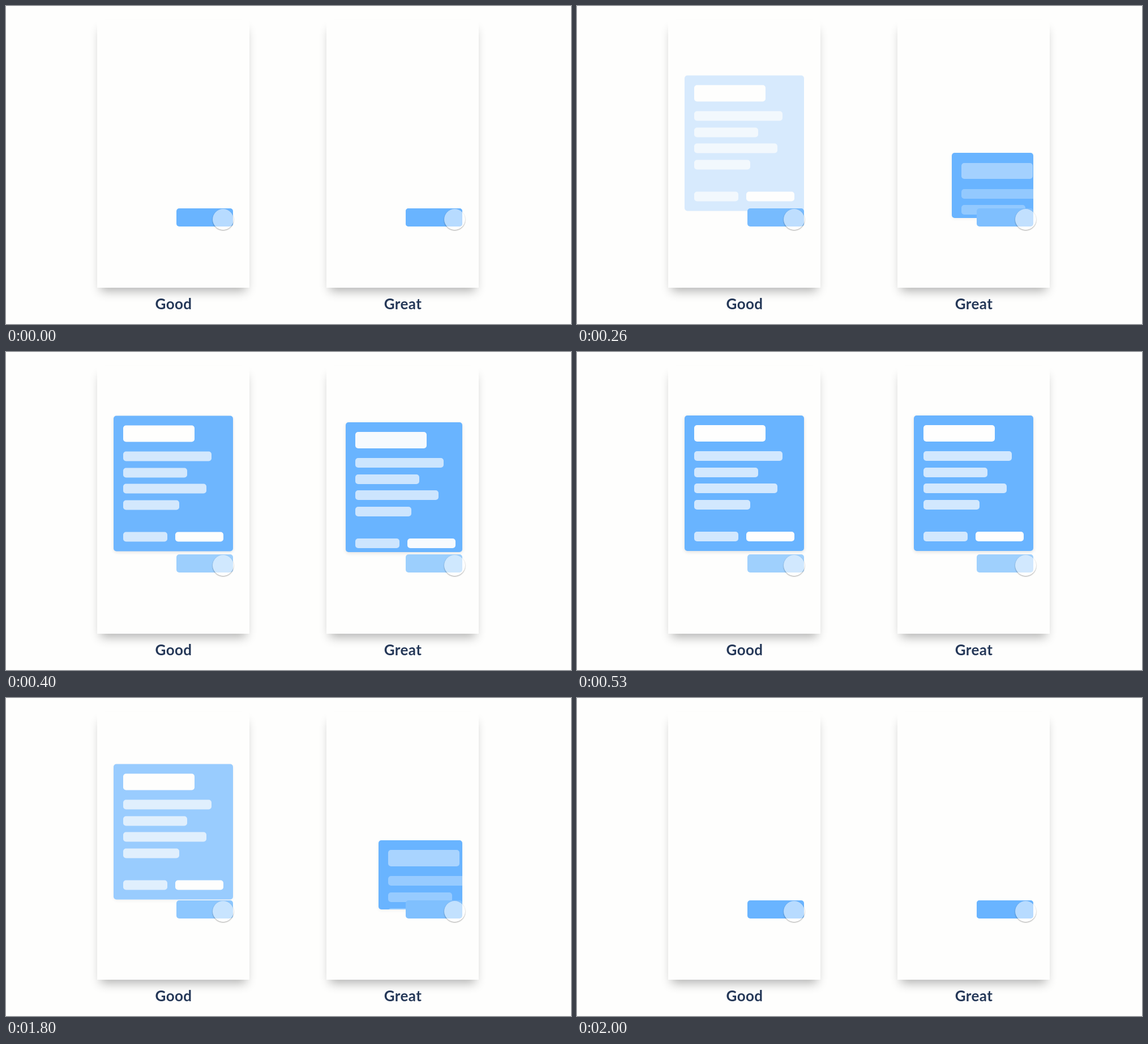
An HTML page for the animation above (2130 ms loop, 998 px wide and 561 px high).

```html
<!DOCTYPE html>
<html lang="en">
<head>
<meta charset="utf-8">
<title>Good and great dialogs</title>
<style>
  @property --p { syntax: "<number>"; inherits: true; initial-value: 0; }
  html, body { margin: 0; width: 100%; height: 100%; overflow: hidden; background: #fefefd; }
  .side { position: absolute; left: 0; top: 0; }
  .side div { position: absolute; box-sizing: border-box; }
  .side .panel {
    left: 161px; top: 24px; width: 269px; height: 473px; background: #fefefd;
    box-shadow: 0 12px 17px -6px rgba(0,0,0,.3);
  }
  .side .card {
    left: 190px; top: 111.5px; width: 211px; height: 239.5px;
    border-radius: 5px; background: #69b4ff; overflow: hidden;
    box-shadow: 0 2px 6px rgba(0,0,0,calc(.12 * var(--p)));
  }
  .fade .card {
    opacity: var(--p);
    transform: translateY(calc(14px * (1 - var(--p))));
  }
  .grow .card {
    left: calc(301px - 111px * var(--p));
    top: calc(357px - 245.5px * var(--p));
    width: calc(100px + 111px * var(--p));
    height: calc(32px + 207.5px * var(--p));
  }
  .grow .content { opacity: var(--p); }
  .bar { border-radius: 5px; background: #fefefe; }
  .soft { opacity: .71; }
  .side .button {
    left: 301px; top: 357px; width: 100px; height: 32px; border-radius: 5px;
    background: color-mix(in srgb, #9fd0fd calc(var(--p) * 100%), #69b4ff);
  }
  .side .touch {
    left: 365px; top: 357.5px; width: 37px; height: 37px; border-radius: 50%;
    background: rgba(255,255,255,.52);
    box-shadow: 0 1px 2px rgba(0,0,0,.38);
  }
  .grow .touch { left: 368.5px; }
  .side .label {
    left: 196px; top: 512px; width: 200px; text-align: center;
    font: 700 26px/26px Lato, "Open Sans", sans-serif;
    letter-spacing: .4px; color: #253858;
  }
</style>
</head>
<body>
<script>
const LOOP = 2130;
const TICK = 1000 / 15;
const LEAD = 8; // frame times are rounded down to 10 ms

function add(parent, name) {
  const el = document.createElement('div');
  el.className = name;
  parent.append(el);
  return el;
}

function addBar(parent, left, top, width, height, name = 'bar') {
  const box = { left, top, width, height };
  const bar = add(parent, name);
  for (const key in box) bar.style[key] = box[key] + 'px';
}

function makeSide(name, text, x) {
  const side = add(document.body, 'side ' + name);
  side.style.left = x + 'px';
  add(side, 'panel');
  const content = add(add(side, 'card'), 'content');
  addBar(content, 17, 17.5, 126, 28.5);
  [156, 113, 147, 99].forEach((width, i) =>
    addBar(content, 17, 63.5 + 28.65 * i, width, 17, 'bar soft'));
  addBar(content, 17, 205.5, 78, 17, 'bar soft');
  addBar(content, 108.5, 205.5, 85.5, 17);
  add(side, 'button');
  add(side, 'touch');
  add(side, 'label').textContent = text;
  return side;
}

// Opens and closes a card; each span is [start, duration] in ms.
function openClose(side, easing, [open, openFor], [close, closeFor]) {
  const key = (p, time) => ({ '--p': p, offset: time / LOOP, easing });
  const motion = side.animate([
    key(0, 0), key(0, open), key(1, open + openFor),
    key(1, close), key(0, close + closeFor), key(0, LOOP)
  ], { duration: LOOP, fill: 'both' });
  motion.pause();
  return motion;
}

const motions = [
  openClose(makeSide('fade', 'Good', 0),
    'cubic-bezier(.4, 0, .4, 1)', [188, 262], [1694, 312]),
  openClose(makeSide('grow', 'Great', 405),
    'cubic-bezier(.4, 0, .2, 1)', [167, 320], [1679, 320])
];
const start = performance.now();

function draw() {
  const t = (performance.now() - start) % LOOP;
  const held = Math.floor((t + LEAD) / TICK) * TICK;
  for (const motion of motions) motion.currentTime = Math.min(held, LOOP - 1);
  requestAnimationFrame(draw);
}
draw();
</script>
</body>
</html>
```
